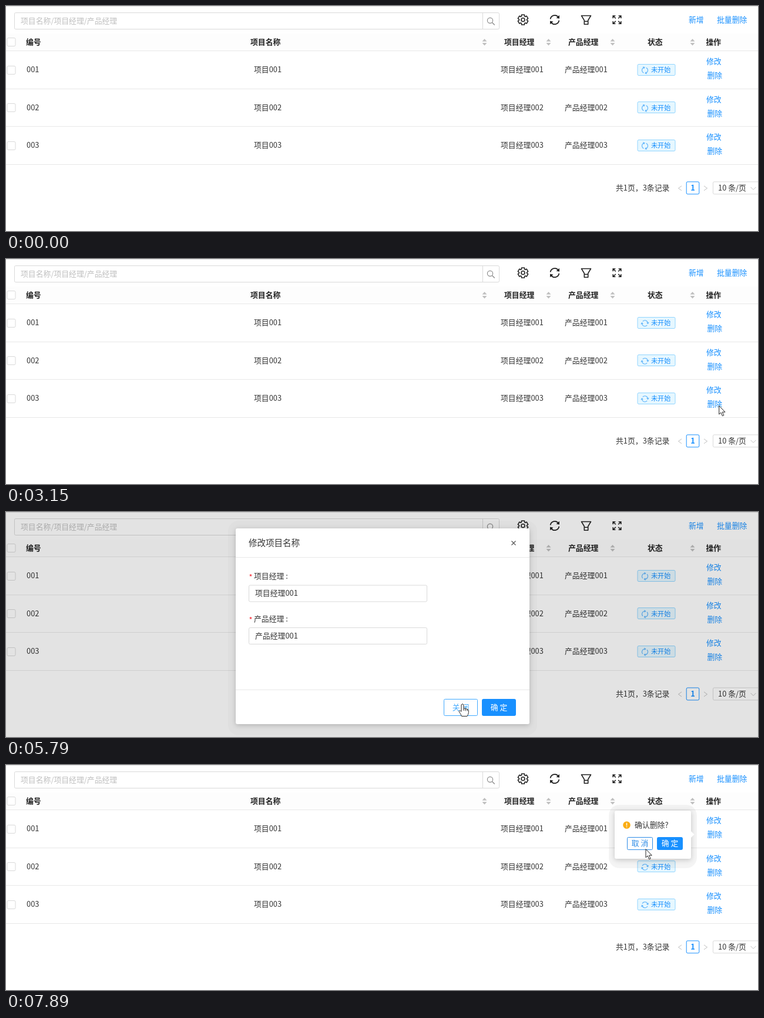
An HTML page that plays this animation: 1280 px wide and 384 px high, repeating every 8 s.

```html
<!DOCTYPE html>
<html lang="zh-CN">
<head>
<meta charset="utf-8">
<style>
  html, body { margin: 0; height: 100%; overflow: hidden; background: #fff; }
  svg { display: block; width: 100vw; height: 100vh; }
  text { font: 12.85px "Noto Sans CJK SC", "Noto Sans CJK", "Noto Sans", sans-serif; }
</style>
</head>
<body>
<svg id="stage" viewBox="0 0 1280 384"></svg>
<script>
const BLUE = '#1890ff', GREY = '#bfbfbf', BORDER = '#d9d9d9', INK = '#333';

// Text is placed by its left edge (or anchor) and its vertical centre.
const text = (x, cy, s, fill = INK, size = 12.85, extra = '', weight = 400) =>
  `<text x="${x}" y="${cy + size * .34}" fill="${fill}" style="font-size:${size}px;font-weight:${weight}" ${extra}>${s}</text>`;
const bold = (x, cy, s) => text(x, cy, s, '#222', 12.85, '', 700);
const centred = (x, cy, s, fill, weight) =>
  text(x, cy, s, fill, 12.85, 'text-anchor="middle"', weight);
const box = (x, y, w, h, stroke = BORDER, fill = '#fff', r = 2, extra = '') =>
  `<rect x="${x + .5}" y="${y + .5}" width="${w}" height="${h}" rx="${r}" fill="${fill}" stroke="${stroke}" ${extra}/>`;
const line = (d, stroke = GREY, width = 1, extra = '') =>
  `<path d="${d}" fill="none" stroke="${stroke}" stroke-width="${width}" ${extra}/>`;
const at = (x, y, body, attrs = '') => `<g transform="translate(${x} ${y})" ${attrs}>${body}</g>`;
const turns = (n, body) =>
  Array.from({ length: n }, (_, i) => `<g transform="rotate(${i * 360 / n})">${body}</g>`).join('');

const syncIcon = (color, width = 1.8) => turns(2,
  line('M-7.4-1.2A7.5 7.5 0 0 1 6-4.6', color, width) +
  `<path d="M8-7.8V-2L2.6-3.1Z" fill="${color}"/>`);

function gearIcon() {
  const points = [];
  for (let k = 0; k < 6; k++)
    for (const [r, a] of [[6.6, -24], [8.9, -16], [8.9, 16], [6.6, 24]]) {
      const angle = (k * 60 - 90 + a) * Math.PI / 180;
      points.push((r * Math.cos(angle)).toFixed(2) + ',' + (r * Math.sin(angle)).toFixed(2));
    }
  return `<g fill="none" stroke="#222" stroke-width="1.6" stroke-linejoin="round">
    <polygon points="${points.join(' ')}"/><circle r="3"/></g>`;
}

function toolbar() {
  return line('M0 .5H1280', '#e0e0e0') +
    box(14, 11, 825, 28) + line('M811.5 11V40', BORDER) +
    text(25, 25.5, '项目名称/项目经理/产品经理', GREY) +
    `<circle cx="824" cy="24.8" r="4.6" fill="none" stroke="#8c8c8c" stroke-width="1.2"/>` +
    line('M827.5 28.3L831.8 32.6', '#8c8c8c', 1.4) +
    at(880, 23.5, gearIcon()) + at(934, 23.5, syncIcon('#222')) +
    line('M979.5 16.5H995.5L990.7 24.5V31.3H984.3V24.5ZM984.3 26.3H990.7', '#222', 1.6, 'stroke-linejoin="round"') +
    at(1040, 23.5, turns(4, line('M2.2 2.2L6.6 6.6M2.6 6.8H6.8V2.6', '#222', 1.6))) +
    text(1162, 23.5, '新增', BLUE) + text(1210, 23.5, '批量删除', BLUE);
}

function tableHead() {
  const titles = [[34, '编号'], [416, '项目名称'], [848, '项目经理'], [957, '产品经理'], [1092, '状态'], [1191.5, '操作']];
  return '<rect y="47" width="1280" height="29" fill="#fdfdfd"/>' +
    line('M0 76.5H1280', '#e8e8e8') + box(1.5, 54, 14, 14) +
    titles.map(([x, s]) => bold(x, 61.5, s)).join('') +
    [814.5, 923.5, 1032.5, 1168.5].map(x =>
      `<path d="M${x - 4} 60.5h8l-4-4.5zm0 2.5h8l-4 4.5z" fill="${GREY}"/>`).join('');
}

function row(i) {
  const y = 109 + i * 64.5, id = '00' + (i + 1);
  return box(1.5, Math.round(y - 7.5), 14, 14) +
    text(35, y, id) + text(422, y, '项目' + id) +
    text(842, y, '项目经理' + id) + text(951, y, '产品经理' + id) +
    box(1074.5, Math.round(y - 10.5), 64, 19, '#91d5ff', '#e6f7ff') +
    at(1087.5, y + .7, `<g class="spin">${syncIcon('#5db3fb', 1.6)}</g>`) +
    text(1098, y + .3, '未开始', BLUE, 11.1) +
    text(1192, y - 14, '修改', BLUE) + text(1193.5, y + 10, '删除', BLUE) +
    line(`M0 ${Math.floor(y + 32) + .5}H1280`, '#e8e8e8');
}

function pager() {
  return text(1038, 310.5, '共1页，3条记录') +
    line('M1150 307L1144.5 311L1150 315M1188 307L1193.5 311L1188 315') +
    box(1157.7, 299.5, 21.6, 21, BLUE) + centred(1169, 310.5, '1', BLUE, 600) +
    box(1203, 299.5, 90, 21) + text(1212, 310.5, '10 条/页') +
    line('M1267.5 309L1272 313.5L1276.5 309');
}

const panel = (x, y, w, h, spread, dim) =>
  `<rect x="${x - spread}" y="${y - spread}" width="${w + 2 * spread}" height="${h + 2 * spread + 6}" rx="18" opacity="${dim}"/>
   <rect x="${x}" y="${y}" width="${w}" height="${h}" rx="3" fill="#fff" style="filter:drop-shadow(0 2px 4px #0003)"/>`;

// A default button (restyled on hover) next to a primary one.
const buttons = (id, x, y, w, h, gap, no, yes) =>
  `<g id="${id}">${box(x, y, w, h)}${centred(x + w / 2 + .5, y + h / 2 + .5, no, INK)}</g>` +
  box(x + w + gap, y, w, h, BLUE, BLUE) +
  centred(x + w * 1.5 + gap + .5, y + h / 2 + .5, yes, '#fff', 500);

const field = (y, label) =>
  text(413.5, y + 2, '*', '#f5222d') + text(422, y, label + ' :') +
  box(413, y + 14.5, 303, 28) + text(424, y + 29, label + '001');

function modal() {
  return panel(391, 28, 500, 334, 13, .02) +
    text(413, 53, '修改项目名称', INK, 14.5) +
    line('M860.5 49.5L867.5 56.5M867.5 49.5L860.5 56.5', '#555', 1.2) +
    line('M391 77.5H891M391 303.5H891', '#e8e8e8') +
    field(110, '项目经理') + field(182.5, '产品经理') +
    buttons('close', 745, 319, 57, 28, 8, '关 闭', '确 定');
}

function confirmBox() {
  return panel(1036, 78, 130, 82, 10, .045) +
    '<path d="M1166 113l5.5 5.5l-5.5 5.5z" fill="#fff"/>' +
    '<circle cx="1056.5" cy="102.5" r="6.3" fill="#faad14"/>' +
    line('M1056.5 98.8V103.4M1056.5 104.8V106.3', '#fff', 1.4) +
    text(1070, 102.5, '确认删除?') +
    buttons('cancel', 1057, 123, 43, 21, 8, '取 消', '确 定');
}

const pointer = d => `<path d="${d}" fill="#fff" stroke="#222" stroke-linejoin="round"/>`;
stage.innerHTML = toolbar() + tableHead() + [0, 1, 2].map(row).join('') + pager() +
  `<rect id="ripple" x="1183" y="83.5" width="43" height="22" rx="4" fill="none" stroke="${BLUE}" stroke-opacity=".2" stroke-width="4"/>
  <rect id="mask" width="1280" height="384"/>
  <g id="modal">${modal()}</g><g id="confirm">${confirmBox()}</g>
  <g id="cursor">
    <g id="arrow">${pointer('M.5.5V15L3.7 12L6.2 17.8L8.6 16.8L6.1 11.2H10.8Z')}</g>
    <g id="hand">${pointer('M-2 1.5Q0-1.5 2 1.5V8Q4 6.5 5 8.5Q7.2 7.5 8 9.5Q10.2 9 10.3 11.5V15Q10 18 8 21H-1.5Q-3 17-6 13Q-5.5 10-2 13ZM2 8V11.5M5 8.5V12M8 9.5V12')}</g>
  </g>`;

const el = id => document.getElementById(id);
const show = (id, on) => el(id).style.display = on ? '' : 'none';
const within = (t, a, b) => t >= a && t < b;
const spinners = document.querySelectorAll('.spin');

// Screen updates: each run opens after 150 ms, then repeats every 120 ms.
const ticks = [0];
for (const n of [3, 2, 3, 1, 2, 1, 7, 4, 2, 2, 2, 2, 2, 2, 3, 4, 4, 4, 3, 1, 2, 2, 2])
  for (let i = 0; i < n; i++) ticks.push(ticks.at(-1) + (i ? 120 : 150));

// Pointer path: time, x, y
const path = [
  [2370, 925, 349], [2490, 1004, 331], [3000, 1221, 240], [3270, 1207, 258], [3540, 1191, 200],
  [3810, 1192, 96], [3960, 1199, 93], [4350, 1200, 93], [4500, 1199, 101], [4620, 905, 170],
  [4770, 700, 220], [4890, 654, 270], [5010, 744, 300], [5280, 777, 327.5], [5790, 777, 327.5],
  [5910, 806, 320.5], [6030, 1170, 135], [6180, 1196, 117], [6810, 1196, 117], [6930, 1150, 147],
  [7080, 1149, 148], [7230, 1135, 147], [7350, 1090, 145], [7500, 1088.5, 143], [8000, 1088.5, 143]];

function pointerAt(t) {
  const i = Math.max(1, path.findIndex(p => p[0] >= t));
  const [t0, x0, y0] = path[i - 1], [t1, x1, y1] = path[i];
  const k = (t - t0) / (t1 - t0);
  return [x0 + (x1 - x0) * k, y0 + (y1 - y0) * k];
}

function hover(id, on, color) {
  const [frame, label] = el(id).children;
  frame.setAttribute('stroke', on ? color : BORDER);
  label.setAttribute('fill', on ? color : INK);
}

const zoom = (id, s, x, y) =>
  el(id).setAttribute('transform', `translate(${x} ${y}) scale(${s}) translate(${-x} ${-y})`);

function draw(t) {
  for (const s of spinners)
    s.setAttribute('transform', `rotate(${(t - 4500) * 360 / 956}) scale(.66)`);

  const editing = within(t, 4500, 5910), opening = t < 4620;
  show('ripple', editing && opening);
  show('mask', editing);
  show('modal', editing);
  el('mask').setAttribute('opacity', opening ? .09 : .11);
  zoom('modal', opening ? .9876 : 1, 1199, 101);
  hover('close', t >= 5280, '#40a9ff');

  show('confirm', t >= 6690);
  zoom('confirm', t < 6810 ? .9 : 1, 1171, 119);
  hover('cancel', t >= 7770, '#2b8ae6');

  const pointing = within(t, 5280, 5910) || within(t, 6180, 6930);
  show('cursor', t >= path[0][0]);
  show('hand', pointing);
  show('arrow', !pointing);
  if (t >= path[0][0]) el('cursor').setAttribute('transform', `translate(${pointerAt(t)})`);
}

function loop() {
  const now = performance.now() % 8000;
  draw(ticks.findLast(t => t <= now));
  requestAnimationFrame(loop);
}
loop();
</script>
</body>
</html>
```
